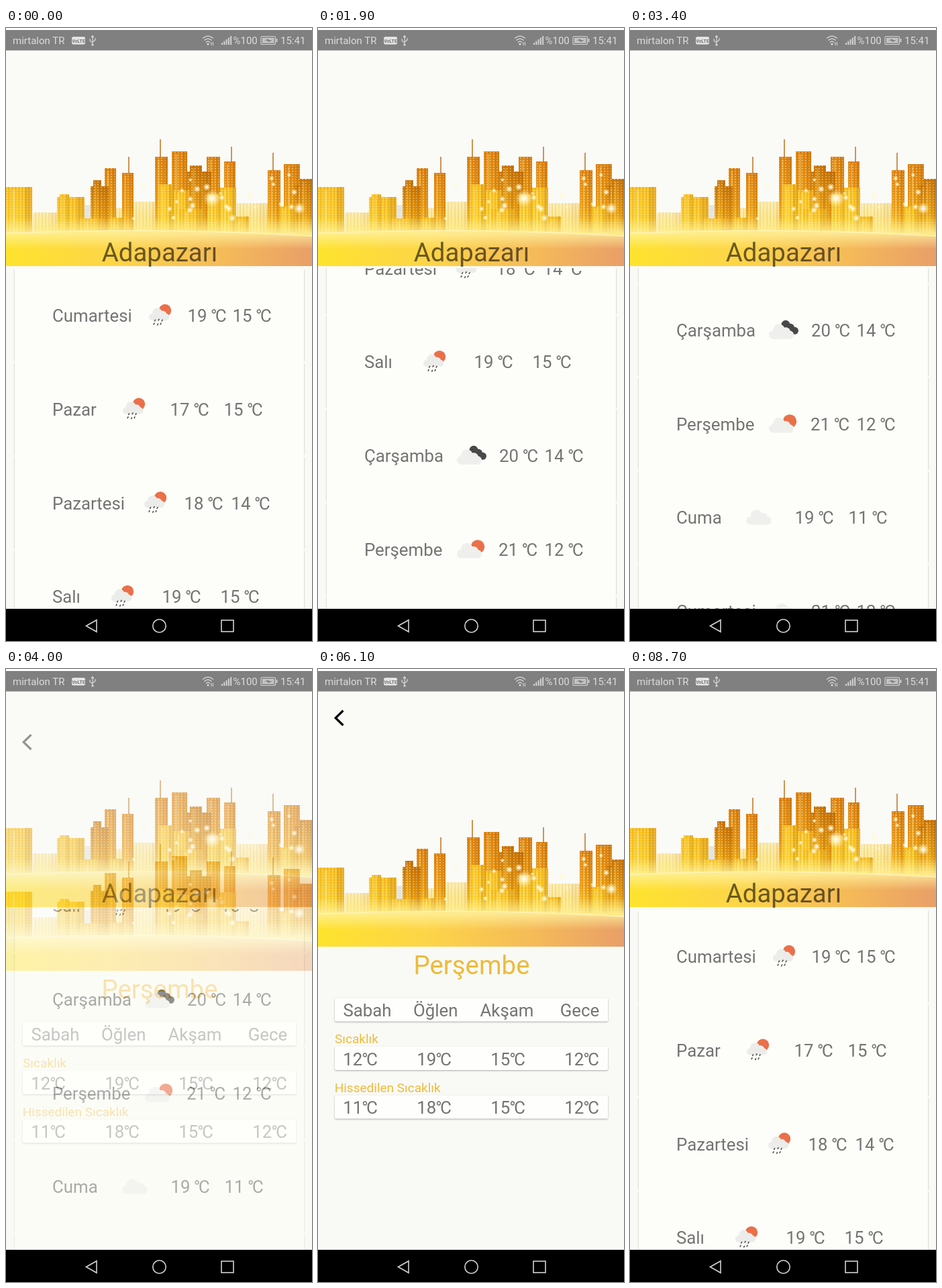
An HTML page that plays this animation: 456 by 914 pixels, repeating every 8.8 s.

```html
<!DOCTYPE html>
<html lang="tr">
<head>
<meta charset="utf-8">
<title>Hava durumu</title>
<style>
html, body { margin: 0; width: 100%; height: 100%; overflow: hidden; background: #fff; }
svg { display: block; width: 100%; height: 100%; font-family: Roboto, "Noto Sans CJK JP", "Noto Sans CJK SC", sans-serif; font-size: 25.8px; }
text { fill: #747472; white-space: pre; }
.bar text { fill: #dcdcdc; font-size: 15px; }
.title { font-size: 38.4px; text-anchor: middle; }
.amber { fill: #efba3c; }
.label { font-size: 19px; }
.card { fill: #fefefc; filter: drop-shadow(0 1.5px 1.2px rgba(0, 0, 0, .32)); }
.line { fill: none; stroke: #d2d2d2; stroke-width: 1.6; }
#rows { animation: scroll 8.8s infinite; }
#detail { animation: page 8.8s step-end infinite; }

/* Movement advances in 100 ms steps */
@keyframes scroll {
  0% { transform: translateY(0); animation-timing-function: step-end; }
  11.36% { transform: translateY(-55px); animation-timing-function: steps(4); }
  15.9% { transform: translateY(-231px); animation-timing-function: steps(4); }
  20.45% { transform: translateY(-300px); animation-timing-function: step-end; }
  21.59% { transform: translateY(-350px); animation-timing-function: steps(4); }
  26.13% { transform: translateY(-579px); animation-timing-function: steps(3); }
  29.54% { transform: translateY(-611px); animation-timing-function: step-end; }
  36.36% { transform: translateY(-596px); animation-timing-function: steps(2); }
  38.63% { transform: translateY(-537px); animation-timing-function: steps(4); }
  43.18% { transform: translateY(-495px); animation-timing-function: step-end; }
  78.4% { transform: translateY(-470px); animation-timing-function: steps(5); }
  84.09% { transform: translateY(-260px); animation-timing-function: step-end; }
  85.22% { transform: translateY(-220px); animation-timing-function: steps(7); }
  93.18%, 100% { transform: translateY(0); }
}
@keyframes page {
  0% { opacity: 0; transform: translateY(60px); }
  45.45% { opacity: .4; transform: translateY(36px); }
  46.58% { opacity: .85; transform: translateY(9px); }
  47.72% { opacity: 1; transform: none; }
  74.99% { opacity: .8; transform: translateY(10px); }
  76.13% { opacity: .3; transform: translateY(36px); }
  77.27%, 100% { opacity: 0; transform: translateY(60px); }
}
</style>
</head>
<body>
<svg viewBox="0 0 456 914" preserveAspectRatio="none">
  <defs>
    <linearGradient id="dark" x2="0" y2="1">
      <stop offset="0" stop-color="#dc8010"/><stop offset=".5" stop-color="#eb9c14"/><stop offset="1" stop-color="#ffdc38"/>
    </linearGradient>
    <linearGradient id="deep" x2="0" y2="1">
      <stop offset="0" stop-color="#c87306"/><stop offset=".55" stop-color="#e8a010"/><stop offset="1" stop-color="#ffdc38"/>
    </linearGradient>
    <linearGradient id="gold" x2="0" y2="1">
      <stop offset="0" stop-color="#f9c021"/><stop offset="1" stop-color="#fede3c"/>
    </linearGradient>
    <linearGradient id="pale" x2="0" y2="1">
      <stop offset="0" stop-color="#fdeeb4"/><stop offset="1" stop-color="#fddf58"/>
    </linearGradient>
    <linearGradient id="ground">
      <stop offset="0" stop-color="#fee32e"/><stop offset=".35" stop-color="#fdd548"/>
      <stop offset=".7" stop-color="#f5bb58"/><stop offset="1" stop-color="#e99f68"/>
    </linearGradient>
    <linearGradient id="haze" x2="0" y2="1">
      <stop offset="0" stop-color="#fff3a0" stop-opacity="0"/><stop offset=".5" stop-color="#fff2a0" stop-opacity=".8"/>
      <stop offset="1" stop-color="#fff0a0" stop-opacity="0"/>
    </linearGradient>
    <radialGradient id="glow">
      <stop offset="0" stop-color="#fff"/><stop offset=".3" stop-color="#fffbe0" stop-opacity=".8"/>
      <stop offset="1" stop-color="#fff3b0" stop-opacity="0"/>
    </radialGradient>
    <pattern id="panes" width="5" height="4" patternUnits="userSpaceOnUse">
      <path d="M1 1h2v1.6h-2z" fill="#fff6c4" opacity=".5"/><path d="M4 0v4" stroke="#b96500" stroke-width=".8" opacity=".28"/>
    </pattern>
    <clipPath id="photoBox"><path d="M0 -30H456V355H0z"/></clipPath>
    <clipPath id="listBox"><path d="M0 358H456V866H0z"/></clipPath>
    <clipPath id="pageBox"><path d="M0 34H456V866H0z"/></clipPath>
    <g id="city" clip-path="url(#photoBox)"></g>
    <g id="cloud">
      <rect y="10" width="37" height="12.5" rx="6.2"/><circle cx="15" cy="8.8" r="8.8"/><circle cx="25" cy="12" r="7"/>
    </g>
  </defs>

  <path d="M0 34H456V866H0z" fill="#f9faf5"/>
  <g clip-path="url(#pageBox)"><use href="#city"/></g>
  <text class="title" x="229" y="348" style="fill:#000;opacity:.58">Adapazarı</text>
  <g clip-path="url(#listBox)"><g id="rows"></g></g>

  <g clip-path="url(#pageBox)">
    <g id="detail">
      <path d="M0 34H456V866H0z" fill="#f9faf5"/>
      <use href="#city" y="59"/>
      <path d="M37.500 62L26.200 73L37.500 84" fill="none" stroke="#000" stroke-width="3.2"/>
      <text class="title amber" x="229" y="455">Perşembe</text>
      <g id="table"></g>
    </g>
  </g>

  <g class="bar">
    <path d="M0 3H456V33.5H0z" fill="#808080"/>
    <text x="10" y="24">mirtalon TR</text>
    <rect x="98" y="13" width="20" height="11.5" rx="2.5" fill="#e4e4e4"/>
    <text x="108" y="21.7" text-anchor="middle" style="font-size:7px;font-weight:700;fill:#777">VoLTE</text>
    <path class="line" style="stroke-width:1.3" d="M129 13V25M125 16v3l4 3M133 15v3l-4 3M127 14l2-2.5 2 2.5"/>
    <circle cx="129" cy="25" r="1.6" fill="#dcdcdc"/>
    <path class="line" d="M293 15.5q8-7 16 0M295.5 18.5q5.5-5 11 0M298 21.5q3-3 6 0"/>
    <circle cx="301" cy="24" r="1.5" fill="#dcdcdc"/>
    <path d="M306 21v5M308.5 21v5" stroke="#dcdcdc"/>
    <path class="line" style="stroke-width:2" d="M322 25v-3M325.3 25v-5.5M328.6 25v-8M331.9 25v-10.5M335.2 25v-13"/>
    <text x="338.5" y="24">%100</text>
    <rect class="line" style="stroke-width:1.2" x="380" y="12.5" width="21.5" height="12" rx="2"/>
    <rect x="382" y="14.5" width="17.5" height="8" fill="#c4c4c4"/>
    <path d="M403.5 16v5" stroke="#dcdcdc" stroke-width="1.6"/>
    <path d="M385 18.5l7-2-1 1.8 6 .2-7 2.2 1-1.9z" fill="#666"/>
    <text x="409" y="24">15:41</text>
  </g>
  <path d="M0 866H456V914H0z"/>
  <path class="line" d="M119.5 891.5L135 882.7V900.3z"/>
  <circle class="line" cx="228.5" cy="891.5" r="9.7"/>
  <rect class="line" x="321" y="883" width="18" height="17"/>
</svg>
<script>
const put = (id, parts) => document.getElementById(id).innerHTML = parts.join('');
const text = (x, y, s, cls = '') => `<text x="${x}" y="${y}" class="${cls}">${s}</text>`;
const temp = (x, y, n) => text(x, y, n + '℃');
const cloud = (x, y, fill = '#efefed', scale = 1) =>
  `<use href="#cloud" transform="translate(${x} ${y}) scale(${scale})" fill="${fill}"/>`;
const disc = (x, y, r, fill = '#e9704a') => `<circle cx="${x}" cy="${y}" r="${r}" fill="${fill}"/>`;

// Skyline: left, width, top of each block, back to front
const blocks = {
  pale: [[40, 36, 275], [190, 37, 259], [344, 46, 261], [164, 10, 268]],
  dark: [[147, 17, 209], [173, 17, 216], [222, 19, 192], [247, 23, 184], [299, 20, 192],
         [325, 17, 199], [390, 19, 212], [414, 24, 203]],
  deep: [[126, 27, 236], [130, 12, 227], [270, 36, 214], [274, 18, 205], [430, 26, 234], [438, 18, 225]],
  gold: [[0, 39, 237], [76, 41, 252], [80, 14, 248], [110, 36, 284], [227, 22, 233], [250, 24, 242],
         [300, 22, 248], [319, 24, 238], [408, 23, 266], [258, 36, 270], [342, 20, 281], [155, 20, 283]]
};
const towers = Object.entries(blocks).flatMap(([kind, list]) => list.map(([x, w, y]) => {
  const box = `x="${x}" y="${y}" width="${w}" height="${318 - y}"`;
  const shade = `<path d="M${x + w * .72} ${y}h${w * .28}V305h${-w * .28}z" fill="#a85800" opacity="${kind === 'pale' ? .06 : .2}"/>`;
  const light = `<path d="M${x + w * .3} ${y + 4}V305" stroke="#fff0a0" stroke-width="${w * .12}" opacity=".3"/>`;
  return `<rect ${box} fill="url(#${kind})"/><rect ${box} fill="url(#panes)"/>${shade}${light}`;
}));
const masts = [[183, 192, 217], [230, 166, 193], [336, 177, 200], [398, 186, 213]]
  .map(([x, a, b]) => `<path d="M${x} ${a}V${b}" stroke="#b8690c" stroke-width="1.4"/>`);

let seed = 7;
const rand = () => (seed = seed * 16807 % 2147483647) / 2147483647;
const sparks = Array.from({ length: 26 }, () =>
  disc(190 + rand() * 255, 215 + rand() * 75, 2 + rand() * 4, 'url(#glow)'));

put('city', [
  '<path d="M0 -30H456V355H0z" fill="#fafaf7"/>',
  '<ellipse cx="125" cy="276" rx="32" ry="12" fill="#d5d7dd" opacity=".6"/>',
  ...towers, ...masts, ...sparks,
  disc(307, 254, 13, 'url(#glow)'), disc(437, 269, 9, 'url(#glow)'),
  '<path d="M0 306Q228 297 456 310V355H0z" fill="url(#ground)"/>',
  '<path d="M0 282H456V330H0z" fill="url(#haze)"/>',
  '<path d="M0 306Q228 297 456 310" fill="none" stroke="#fff6b8" stroke-width="2" opacity=".8"/>'
]);

// Icons are drawn around the middle of the row's text
const drops = [[9, 7], [14.5, 6], [19.5, 7], [7.5, 12], [13, 13], [17.5, 12]]
  .map(([x, y]) => `<path d="M${x + .8} ${y - 1.3}l-1.4 2.8" stroke="#484848" stroke-width="1.5"/>`).join('');
const puff = [[25, -8.5, 6.5], [32, -4, 6], [38.5, .5, 5.5]].map(p => disc(...p, '#484848')).join('');
const icons = {
  rain: disc(24, -8, 9.2) + cloud(0, -11.5, '#ececea', .82) + drops,
  dark: puff + cloud(0, -9.5),
  sun: disc(31, -4, 10.2) + cloud(0, -9.5),
  cloud: cloud(0, -12)
};
const days = [
  ['Cumartesi', 'rain', 213, 19, 270.5, 15, 337.5],
  ['Pazar', 'rain', 174, 17, 244.5, 15, 324.5],
  ['Pazartesi', 'rain', 206, 18, 265.5, 14, 335.5],
  ['Salı', 'rain', 157, 19, 232.5, 15, 319.5],
  ['Çarşamba', 'dark', 207, 20, 270, 14, 337.5],
  ['Perşembe', 'sun', 207, 21, 269, 12, 337.5],
  ['Cuma', 'cloud', 173.5, 19, 245.5, 11, 325.5],
  ['Cumartesi', 'cloud', 211, 21, 270, 12, 337.5]
];
put('rows', days.map(([name, icon, ix, high, hx, low, lx], i) =>
  `<g transform="translate(0 ${359 + i * 139.7})">
    <rect x="11.8" y="1" width="433.4" height="137.8" rx="2" fill="#dfe0dc"/>
    <rect x="13" width="431" height="140" rx="2" fill="#fdfef9"/>
    ${text(69, 79.3, name)}
    <g transform="translate(${ix} 70)">${icons[icon]}</g>
    ${temp(hx, 79.3, high + ' ')}${temp(lx, 79.3, low + ' ')}
  </g>`));

const card = y => `<rect class="card" x="25" y="${y}" width="407" height="35" rx="2"/>`;
const temps = (y, list) => list.map((n, i) => temp(37.3 + i * 110, y, n)).join('');
put('table', [
  card(490.5), card(563), card(635.5),
  text(37.5, 518, 'Sabah'), text(142, 518, 'Öğlen'), text(241.5, 518, 'Akşam'), text(360.7, 518, 'Gece'),
  text(25, 558, 'Sıcaklık', 'label amber'), temps(590.5, [12, 19, 15, 12]),
  text(24.7, 630.5, 'Hissedilen Sıcaklık', 'label amber'), temps(663, [11, 18, 15, 12])
]);
</script>
</body>
</html>
```
